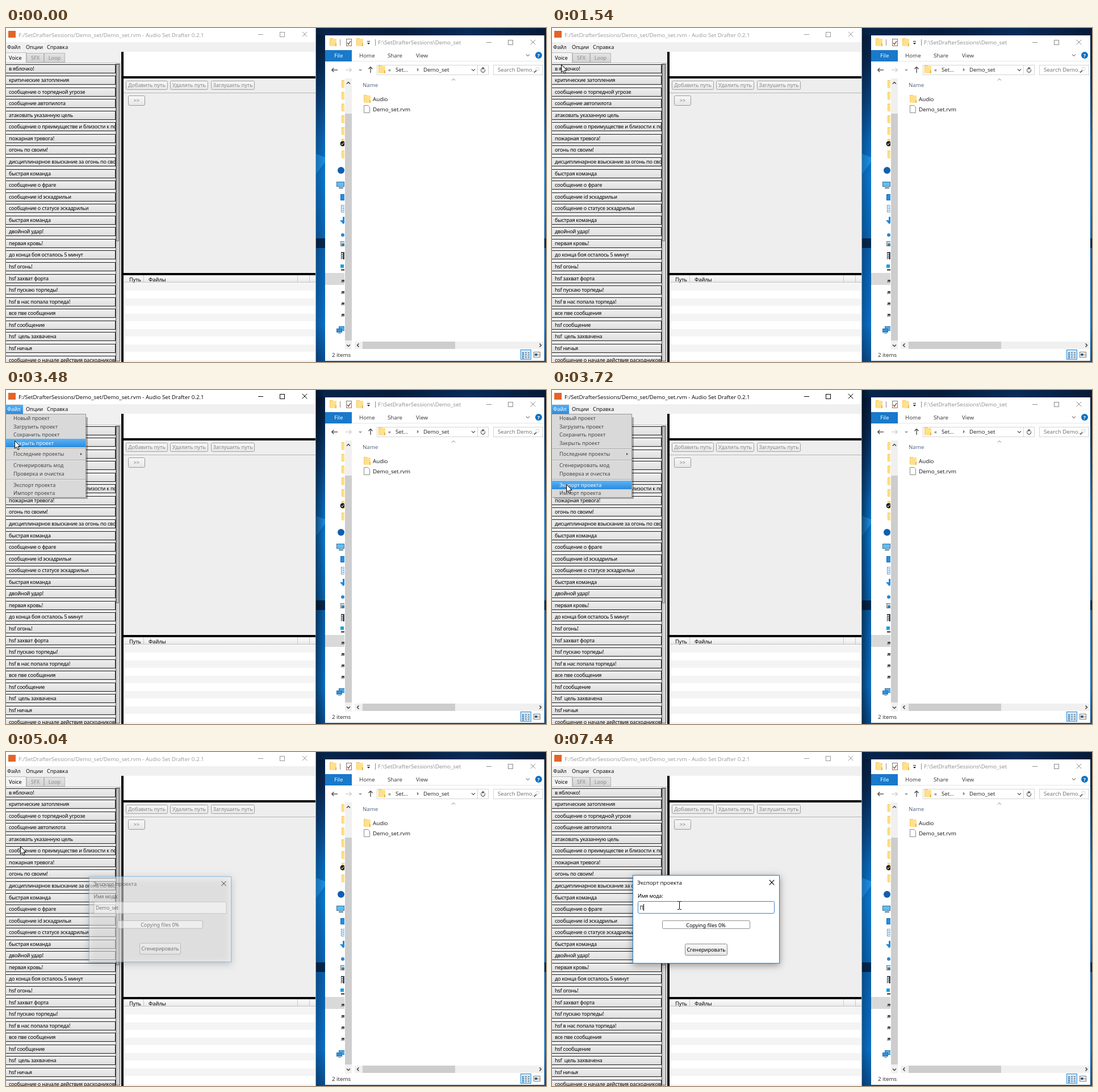
Animation of 951x589 px, one loop 7.99 s. Source, as an HTML page with a canvas:

```html
<!DOCTYPE html>
<html lang="ru">
<head>
<meta charset="utf-8">
<title>Экспорт проекта</title>
<style>
html, body { margin: 0; width: 100%; height: 100%; overflow: hidden; }
canvas { display: block; width: 951px; height: 589px; }
</style>
</head>
<body>
<canvas id="stage" width="951" height="589"></canvas>
<script>
const ctx = document.getElementById('stage').getContext('2d');
const LOOP = 7990;
const UI = '9.75px "Open Sans", sans-serif';
const APP = '9.1px "Noto Sans", sans-serif';
const LIST = '9px "Noto Sans", sans-serif';

const ROWS = [
  'в яблочко!', 'критические затопления', 'сообщение о торпедной угрозе',
  'сообщение автопилота', 'атаковать указанную цель',
  'сообщение о преимуществе и близости к победе', 'пожарная тревога!',
  'огонь по своим!', 'дисциплинарное взыскание за огонь по своим',
  'быстрая команда', 'сообщение о фраге', 'сообщение id эскадрильи',
  'сообщение о статусе эскадрильи', 'быстрая команда', 'двойной удар!',
  'первая кровь!', 'до конца боя осталось 5 минут', 'hsf огонь!',
  'hsf захват форта', 'hsf пускаю торпеды!', 'hsf в нас попала торпеда!',
  'все пве сообщения', 'hsf сообщение', 'hsf  цель захвачена', 'hsf ничья',
  'сообщение о начале действия расходников'
];
const MENU = [
  ['Новый проект', 50], ['Загрузить проект', 64.5], ['Сохранить проект', 79],
  ['Закрыть проект', 93.5], ['Последние проекты', 113], ['Сгенерировать мод', 133],
  ['Проверка и очистка', 147.5], ['Экспорт проекта', 167.5], ['Импорт проекта', 182]
];

function rect(x, y, w, h, fill) {
  ctx.fillStyle = fill;
  ctx.fillRect(x, y, w, h);
}
function frame(x, y, w, h, color, fill) {
  if (fill) rect(x, y, w, h, fill);
  ctx.strokeStyle = color;
  ctx.lineWidth = 1;
  ctx.strokeRect(x + .5, y + .5, w - 1, h - 1);
}
function rounded(x, y, w, h, r, color, fill) {
  ctx.beginPath();
  ctx.roundRect(x + .5, y + .5, w - 1, h - 1, r);
  ctx.fillStyle = fill;
  ctx.fill();
  ctx.strokeStyle = color;
  ctx.lineWidth = 1;
  ctx.stroke();
}
function line(points, color, width = 1) {
  ctx.beginPath();
  points.forEach(([x, y]) => ctx.lineTo(x, y));
  ctx.strokeStyle = color;
  ctx.lineWidth = width;
  ctx.stroke();
}
function poly(points, fill, stroke) {
  ctx.beginPath();
  points.forEach(([x, y]) => ctx.lineTo(x, y));
  ctx.closePath();
  ctx.fillStyle = fill;
  ctx.fill();
  if (stroke) {
    ctx.strokeStyle = stroke;
    ctx.lineWidth = 1;
    ctx.stroke();
  }
}
function disc(x, y, r, fill) {
  ctx.beginPath();
  ctx.arc(x, y, r, 0, Math.PI * 2);
  ctx.fillStyle = fill;
  ctx.fill();
}
function text(s, x, y, font, color, align = 'left', spacing = '0px') {
  ctx.font = font;
  ctx.fillStyle = color;
  ctx.textAlign = align;
  ctx.letterSpacing = spacing;
  ctx.fillText(s, x, y);
}
function shade(x0, y0, x1, y1, ...colors) {
  const g = ctx.createLinearGradient(x0, y0, x1, y1);
  colors.forEach((c, i) => g.addColorStop(i / (colors.length - 1), c));
  return g;
}
// Chevron pointing along (dx, dy).
function chevron(x, y, dx, dy, color, s = 3, w = 1.2) {
  const h = s / 2;
  line([[x - dx * h - dy * s, y - dy * h - dx * s], [x + dx * h, y + dy * h],
        [x - dx * h + dy * s, y - dy * h + dx * s]], color, w);
}
function cross(x, y, s, color, w = 1) {
  line([[x - s, y - s], [x + s, y + s]], color, w);
  line([[x + s, y - s], [x - s, y + s]], color, w);
}
function folder(x, y) {
  rect(x, y, 6, 13, '#f0c85a');
  rect(x + 1, y + 1, 11, 13, '#ffe08c');
  rect(x + 10, y + 9, 2, 5, '#e8b94a');
}
function windowButtons(x, y, color) {
  rect(x - 4, y, 9, 1, color);
  frame(x + 34, y - 4, 9, 9, color);
  cross(x + 78, y, 4.3, color);
}

function drawDesktop(active) {
  rect(0, 0, 951, 589, shade(0, 0, 0, 589,
    '#061c3c', '#082a55', '#0a4583', '#0a67b8', '#0b78d0', '#0b6cc0',
    '#0a62b0', '#0a68bc', '#0b70c8', '#0a4d90'));
  rect(546, 0, 405, 13, shade(546, 0, 951, 0, '#07264d', '#061c3c', '#082b57', '#061a38'));
  poly([[546, 222], [562, 228], [562, 236], [546, 258]], '#1c8fe6');
  rect(546, 371, 16, 17, '#06284f');
  rect(948, 371, 3, 17, '#06284f');
  rect(546, 0, 16, 589, shade(546, 0, 562, 0, active ? 'rgba(0,0,0,.45)' : 'rgba(0,0,0,.22)', 'rgba(0,0,0,0)'));
}

function drawNav() {
  ctx.save();
  ctx.beginPath();
  ctx.rect(562, 89, 34, 478);
  ctx.clip();
  rect(562, 432, 34, 21, '#d9d9d9');
  for (let i = 0; i < 7; i++) folder(591, 92 + i * 20.7);
  disc(593, 204, 4.5, '#1b1b1b');
  line([[590, 204], [592, 206], [595, 202]], '#fff');
  disc(590, 251, 6, '#0f5fae');
  frame(582, 271, 14, 9, '#3b6f9c', '#5cc0f5');
  rect(586, 281, 8, 2, '#60788c');
  frame(589, 293, 9, 11, '#0a66b4', '#1e90e8');
  frame(590, 312, 9, 13, '#6a94ba', '#f4f8fc');
  for (let y = 315; y < 323; y += 3) rect(592, y, 5, 1, '#3f8bcb');
  rect(593, 333, 4, 7, '#2389d8');
  poly([[588, 339], [600, 339], [594, 346]], '#2389d8');
  disc(593, 365, 3, '#2389d8');
  frame(589, 376, 10, 9, '#777', '#b5d9ef');
  rect(591, 380, 6, 4, '#4c7b94');
  rect(590, 395, 9, 13, '#44505c');
  for (let y = 397; y < 407; y += 3) rect(591, y, 2, 2, '#fff');
  rect(589, 417, 6, 6, '#1b9de2');
  rect(590, 425, 8, 3, '#666');
  for (let y = 444; y < 520; y += 20) {
    rect(591, y, 7, 4, '#4d4d4d');
    rect(590, y + 3, 7, 2, '#9a9a9a');
  }
  frame(586, 526, 11, 8, '#2a70a8', '#43aef0');
  frame(582, 530, 10, 7, '#2a70a8', '#2c94dc');
  rect(585, 538, 5, 1, '#777');
  ctx.restore();
}

function drawExplorer() {
  rect(562, 13, 386, 574, '#fff');

  folder(570, 18);
  rect(588, 20, 1, 11, '#8a8a8a');
  frame(599, 19, 10, 13, '#777', '#fff');
  line([[601, 26], [603, 29], [607, 23]], '#b04a2c', 1.4);
  folder(617, 18);
  rect(636, 23, 5, 1, '#222');
  poly([[636, 26], [641, 26], [638.5, 29]], '#222');
  rect(650, 20, 1, 11, '#8a8a8a');
  text('F:\\SetDrafterSessions\\Demo_set', 655, 29, UI, '#8c8c8c');
  windowButtons(850, 25, '#8a8a8a');

  rect(562, 39, 47, 20, '#1979ca');
  text('File', 578, 52, UI, '#fff');
  [['Home', 622], ['Share', 672], ['View', 722]].forEach(([s, x]) => text(s, x, 52, UI, '#333'));
  chevron(919, 48, 0, 1, '#888');
  disc(938, 48, 6, '#0a72c4');
  text('?', 938, 51.5, 'bold 9px "Open Sans", sans-serif', '#fff', 'center');
  rect(609, 58, 339, 1, '#e6e6e6');

  line([[584, 74], [574, 74]], '#444', 1.3);
  chevron(575.5, 74, -1, 0, '#444', 3.5, 1.3);
  line([[598, 74], [608, 74]], '#ccc', 1.3);
  chevron(606.5, 74, 1, 0, '#ccc', 3.5, 1.3);
  chevron(624, 74, 0, 1, '#777', 2);
  line([[642, 79], [642, 69]], '#444', 1.3);
  chevron(642, 70.5, 0, -1, '#444', 3.5, 1.3);

  frame(653, 65, 197, 18, '#d4d4d4');
  folder(656, 66);
  text('«', 673, 76.5, UI, '#333');
  text('Set...', 686, 76.5, UI, '#222');
  chevron(725, 73.5, 1, 0, '#555', 2);
  text('Demo_set', 735, 76.5, UI, '#222');
  chevron(823, 74, 0, 1, '#555');
  rect(830, 66, 1, 16, '#d4d4d4');
  ctx.beginPath();
  ctx.arc(840, 74.5, 3.5, -.6, 4.6);
  ctx.strokeStyle = '#555';
  ctx.lineWidth = 1.2;
  ctx.stroke();
  poly([[839, 68.5], [843, 71], [839, 73.5]], '#555');
  frame(858, 65, 88, 18, '#d4d4d4');
  text('Search Demo...', 866, 76.5, UI, '#6d6d6d');
  ctx.beginPath();
  ctx.arc(936, 72, 3, 0, 7);
  ctx.stroke();
  line([[934, 74.5], [930, 79]], '#555', 1.3);

  drawNav();
  rect(597, 89, 12, 478, '#f0f0f0');
  rect(597, 151, 12, 400, '#cdcdcd');
  chevron(603, 97, 0, -1, '#444', 3, 1.5);
  chevron(603, 560, 0, 1, '#444', 3, 1.5);

  chevron(788, 91, 0, -1, '#777', 3, 1);
  text('Name', 628, 104, UI, '#4c607a');
  folder(630, 118);
  text('Audio', 646, 128.5, UI, '#111');
  poly([[630.5, 136.5], [637.5, 136.5], [640.5, 139.5], [640.5, 149.5], [630.5, 149.5]], '#fff', '#8a8a8a');
  text('Demo_set.rvm', 646, 146.5, UI, '#111');

  rect(614, 553, 334, 13, '#f0f0f0');
  rect(628, 553, 163, 13, '#cdcdcd');
  chevron(620, 559.5, -1, 0, '#444', 3, 1.5);
  chevron(941, 559.5, 1, 0, '#444', 3, 1.5);
  text('2 items', 574, 580, UI, '#222');
  frame(906, 567, 19, 18, '#2f8fd8', '#cce8ff');
  for (let y = 572; y < 582; y += 3) {
    rect(909, y, 3, 2, '#4a7ca5');
    rect(914, y, 3, 1, '#555');
    rect(919, y, 3, 1, '#555');
  }
  frame(929, 571, 12, 10, '#777', '#fff');
  rect(931, 574, 5, 4, '#3d5f7c');
  rect(937, 576, 3, 1, '#777');
}

function drawList() {
  rect(0, 62, 203, 527, '#f0f0f0');
  ROWS.forEach((s, i) => {
    const mid = 71.5 + i * 20.56, y = Math.round(mid - 8);
    frame(-1, y, 194, 16, '#1a1a1a', shade(0, y, 0, y + 16, '#efefef', '#dedede'));
    ctx.save();
    ctx.beginPath();
    ctx.rect(0, y, 192, 16);
    ctx.clip();
    text(s, 5, mid + 3, LIST, '#000', 'left', '-0.2px');
    ctx.restore();
  });
  frame(193, 63, 8, 525, '#555', '#d4d4d4');
  frame(194, 64, 5, 312, '#777', shade(194, 0, 199, 0, '#d2d2d2', '#b0b0b0'));
}

function button(s, x, y, w, h, color, border) {
  rounded(x, y, w, h, 2, border, shade(0, y, 0, y + h, '#f8f8f8', '#e6e6e6'));
  text(s, x + w / 2, y + h / 2 + 3.3, APP, color, 'center');
}

function drawApp(active, open) {
  rect(0, 0, 546, 589, '#f0f0f0');
  rect(0, 0, 546, 25, '#fff');
  rect(4, 5, 13, 12, '#e2642a');
  const ink = active ? '#000' : '#999';
  text('F:/SetDrafterSessions/Demo_set/Demo_set.rvm - Audio Set Drafter 0.2.1', 22, 15.5, UI, ink);
  windowButtons(448, 11, ink);

  if (open) rect(0, 26, 30, 16, shade(0, 26, 0, 42, '#55aef2', '#2f8cdd'));
  text('Файл', 2, 37, APP, open ? '#fff' : '#111');
  text('Опции', 35, 37, APP, '#111');
  text('Справка', 72, 37, APP, '#111');

  [['SFX', 36, 31], ['Loop', 67, 37]].forEach(([s, x, w]) => {
    frame(x, 44, w, 17, '#b8b8b8', shade(0, 44, 0, 61, '#e4e4e4', '#d2d2d2'));
    text(s, x + w / 2, 55.5, APP, '#888', 'center');
  });
  frame(-1, 43, 37, 20, '#bbb', '#f4f4f4');
  rect(0, 61, 203, 1, '#c4c4c4');
  text('Voice', 5, 55.5, APP, '#000');
  drawList();

  rect(203, 42, 4, 547, '#000');
  rect(207, 42, 339, 43, '#fff');
  rect(207, 85, 339, 4, '#000');
  rect(207, 89, 339, 343, '#eee');
  rect(207, 114, 339, 1, '#b4b4b4');
  button('Добавить путь', 211, 93, 74, 16, '#888', '#a0a0a0');
  button('Удалить путь', 289, 93, 67, 16, '#888', '#a0a0a0');
  button('Заглушить путь', 361, 93, 77, 16, '#888', '#a0a0a0');
  button('>>', 215, 119, 30, 18, '#777', '#999');

  rect(207, 432, 339, 4, '#000');
  rect(207, 436, 339, 153, '#fff');
  rect(208, 436, 338, 13, shade(0, 436, 0, 449, '#fff', '#e6e6e6'));
  rect(208, 448, 338, 1, '#c0c0c0');
  [242, 513, 534].forEach(x => rect(x, 436, 1, 13, '#c8c8c8'));
  text('Путь', 217, 446.5, APP, '#000');
  text('Файлы', 251, 446.5, APP, '#000');
  for (let y = 449.5; y < 589; y += 27.2) rect(208, Math.round(y), 338, 13, '#f4f4f4');
  rect(545, 0, 1, 589, active ? '#777' : '#aaa');
}

function drawMenuShadow() {
  rect(141, 48, 3, 144, 'rgba(0,0,0,.3)');
  rect(4, 190, 137, 2, 'rgba(0,0,0,.3)');
}

function drawMenu(y) {
  frame(-1, 42, 142, 148, '#999', '#d9d9d9');
  [103, 123, 157].forEach(s => {
    rect(0, s, 140, 1, '#aaa');
    rect(0, s + 1, 140, 1, '#e8e8e8');
  });
  MENU.forEach(([s, mid]) => {
    const hot = Math.abs(y - mid) < 7.3;
    if (hot) rect(0, mid - 7.5, 140, 15, shade(0, mid - 7, 0, mid + 7, '#5ab2f4', '#2c8cde'));
    text(s, 13, mid + 3, APP, hot ? '#fff' : '#444');
  });
  poly([[131, 111], [134, 113], [131, 115]], '#444');
}

function drawDialog(t) {
  const p = Math.min(1, (Math.floor((t - 4950) / 80) + 1) / 4);
  const scale = .94 + .06 * p;
  ctx.save();
  ctx.globalAlpha = p;
  ctx.translate(271, 295);
  ctx.scale(scale, scale);
  ctx.translate(-271, -295);
  ctx.shadowColor = 'rgba(0,0,0,.4)';
  ctx.shadowBlur = 12;
  ctx.shadowOffsetY = 3;
  rect(142, 217, 259, 156, '#fff');
  ctx.shadowColor = 'transparent';
  frame(142, 217, 259, 156, '#1a80d0');
  text('Экспорт проекта', 150, 234, UI, '#000');
  cross(387, 230, 4.3, '#000', 1.1);
  text('Имя мода:', 151, 257, LIST, '#000', 'left', '-0.15px');

  const focus = t >= 6340, typed = t >= 7440, picked = t >= 6510 && !typed;
  rounded(151, 263, 241, 22, 2, focus ? '#3a80c4' : '#a4a4a4', '#fff');
  if (picked) rect(155, 268, 40, 12, '#308cc6');
  text(typed ? 'П' : 'Demo_set', 154.5, 277.5, LIST, picked ? '#fff' : '#000', 'left', '-0.1px');
  const blink = t >= 6900 && t < 7210;
  if (focus && !blink) rect(typed ? 161 : 195, 268, 1, 12, '#000');

  rounded(194, 297, 155, 15, 1, '#909090', '#fff');
  text('Copying files 0%', 271, 308.5, APP, '#000', 'center');
  button('Сгенерировать', 234, 338, 75, 21, '#000', '#8c8c8c');
  ctx.restore();
}

// Pointer moves, sampled in equal steps that finish at "end".
const outQuad = p => 1 - (1 - p) ** 2;
const smooth = p => p * p * (3 - 2 * p);
const linear = p => p;
const MOVES = [
  { start: 70, end: 530, n: 7, from: [872, 601], to: [76, 151], ex: smooth, ey: smooth },
  { start: 910, end: 1680, n: 11, from: [76, 151], to: [14, 45], ex: outQuad, ey: linear },
  { start: 1770, end: 1930, n: 3, from: [14, 45], to: [13, 30], ex: linear, ey: linear },
  { start: 3480, end: 3720, n: 4, from: [13, 30], to: [25, 165.5], ex: smooth, ey: outQuad },
  { start: 5520, end: 5970, n: 7, from: [25, 165.5], to: [224, 270], ex: outQuad, ey: outQuad }
];
function pointerAt(t) {
  let pos = MOVES[0].from;
  for (const m of MOVES) {
    if (t < m.start) break;
    const pitch = m.n === 11 || m.start === 70 ? 77 : 80;
    const k = Math.floor((t - m.end) / pitch) + m.n;
    const p = Math.max(1, Math.min(m.n, k)) / m.n;
    const mix = (i, ease) => m.from[i] + (m.to[i] - m.from[i]) * ease(p);
    pos = [mix(0, m.ex), mix(1, m.ey)];
  }
  return pos;
}

function drawPointer(x, y, beam) {
  x = Math.round(x);
  y = Math.round(y);
  if (beam) {
    rect(x, y - 6, 1, 13, '#000');
    [y - 7, y + 7].forEach(v => {
      rect(x - 3, v, 3, 1, '#000');
      rect(x + 1, v, 3, 1, '#000');
    });
    return;
  }
  const shape = [[0, 0], [0, 13.5], [3, 10.8], [5.4, 16], [7.6, 15], [5.4, 10], [9.6, 10]];
  poly(shape.map(([a, b]) => [x + a + .5, y + b + .5]), '#fff', '#000');
}

function draw(t) {
  const active = t >= 2620 && t < 4870;
  const open = t >= 2700 && t < 4870;
  const [x, y] = pointerAt(t);
  drawDesktop(active);
  drawExplorer();
  drawApp(active, open);
  if (active) drawMenuShadow();
  if (open) drawMenu(y);
  if (t >= 4950) drawDialog(t);
  drawPointer(x, y, t > 5500 && x > 152 && y > 264);
}

const began = performance.now();
function tick() {
  draw((performance.now() - began) % LOOP);
  requestAnimationFrame(tick);
}
tick();
</script>
</body>
</html>
```
